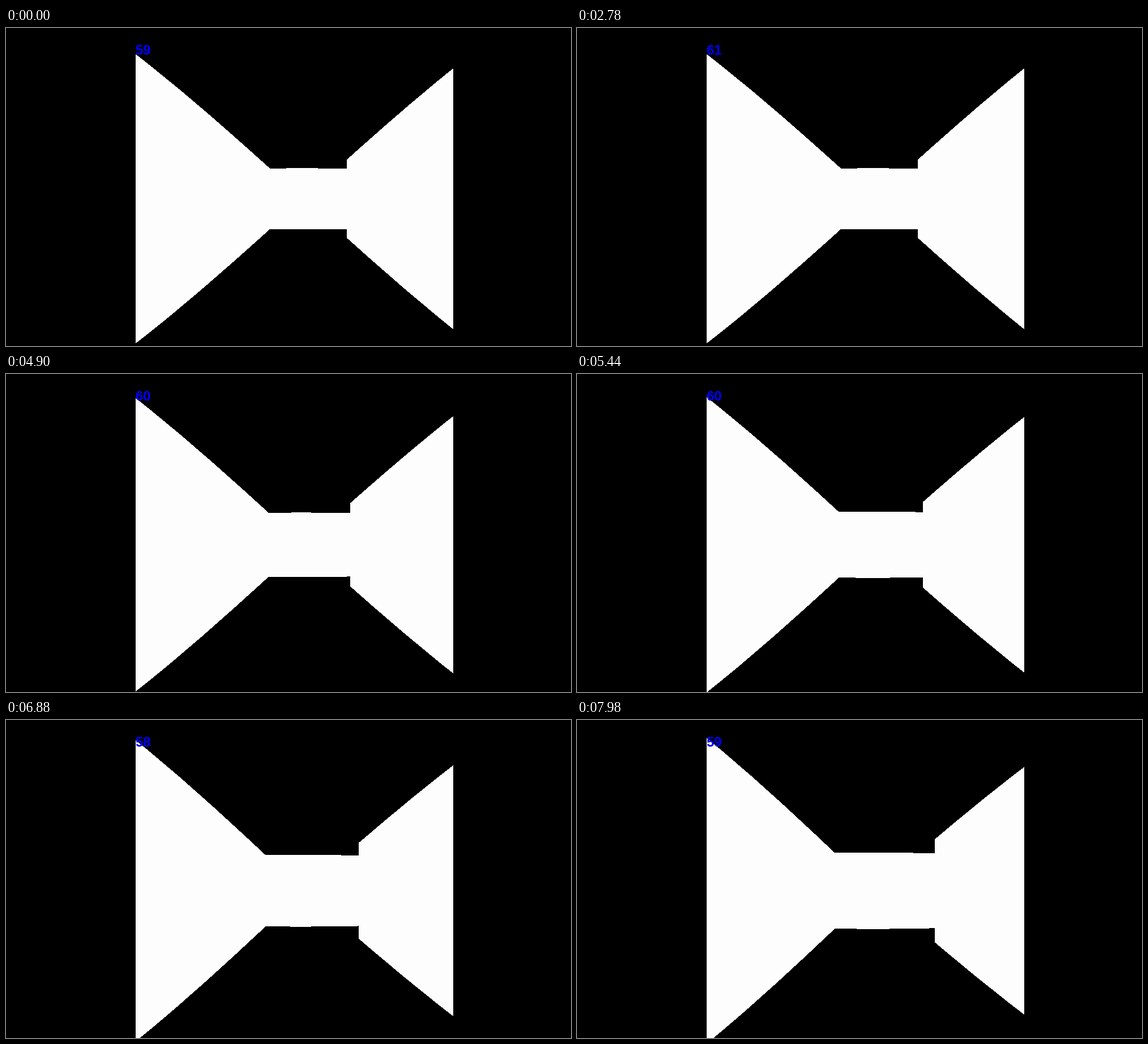
Animation of 998 by 561 pixels, one loop 8000 ms. Source, as an HTML page without scripts:

```html
<!DOCTYPE html>
<html lang="en">
<head>
<meta charset="utf-8">
<title>Corridor walk</title>
<style>
  @property --clock { syntax: "<number>"; inherits: true; initial-value: 0; }
  @property --fps { syntax: "<integer>"; inherits: true; initial-value: 60; }

  html, body { margin: 0; width: 100%; height: 100%; overflow: hidden; background: #000; }

  .stage {
    position: relative;
    width: 998px;
    height: 561px;
    overflow: hidden;
    animation: clock 8s linear infinite, fps 8s step-end infinite;

    /* Steps walked: three per 140 ms, lasting 20, 20 and 100 ms */
    --walk: calc(var(--clock) - 3900);
    --beat: min(2, round(down, mod(var(--walk), 140) / 20, 1));
    --steps: max(0, 3 * round(down, var(--walk) / 140, 1) + var(--beat) + 1);

    /* Distances from the walker, in half corridor widths */
    --left: calc(1 - 0.0006 * var(--steps));
    --right: calc(1 + 0.0006 * var(--steps));
    --corner: calc(7 - 0.0202 * var(--steps));
    --back: calc(9 - 0.0202 * var(--steps));
    --slope: calc(var(--right) / var(--corner));
  }

  svg { position: absolute; inset: 0; display: block; shape-rendering: crispEdges; }
  .wall { fill: #fdfdfe; }
  .left { transform: scaleY(calc(1 / var(--left))); }
  .right { transform: scaleY(calc(1 / var(--right))); }
  .back { transform: scaleY(calc(9 / var(--back))); }

  /* Width follows atan(slope), as its first two series terms */
  .opening {
    fill: #000;
    width: calc(535.7px * (var(--slope) - var(--slope) * var(--slope) * var(--slope) / 3));
  }

  .fps {
    position: absolute;
    left: 229px;
    top: 25px;
    font: bold 24px/27px "Liberation Sans", Arial, sans-serif;
    color: #00f;
    counter-reset: fps var(--fps);
  }
  .fps::after { content: counter(fps); }

  /* A small lead keeps step boundaries clear of rounding */
  @keyframes clock { from { --clock: 2; } to { --clock: 8002; } }

  @keyframes fps {
    0%, 45.75%, 99.75%, 100% { --fps: 59; }
    5.25%, 34.75%, 54.5% { --fps: 61; }
    5.5%, 35%, 47%, 55.75%, 87.25% { --fps: 60; }
    86% { --fps: 58; }
  }
</style>
</head>
<body>
<div class="stage">
  <svg width="998" height="561" viewBox="0 0 998 561">
    <g transform="translate(525.5 301.3)">
      <path class="wall right" d="M0 0C88.17 -79.9 176.33 -159.7 264.5 -230.05V230.05C176.33 159.7 88.17 79.9 0 0Z"/>
      <rect class="opening" y="-302" height="562"/>
      <path class="wall left" d="M0 0C-98.83 -89.55 -197.67 -178.95 -296.5 -255.15V255.15C-197.67 178.95 -98.83 89.55 0 0Z"/>
      <path class="wall back" d="M-120 -52.58Q0 -55.28 120 -52.58V52.58Q0 55.28 -120 52.58Z"/>
    </g>
  </svg>
  <div class="fps"></div>
</div>
</body>
</html>
```
